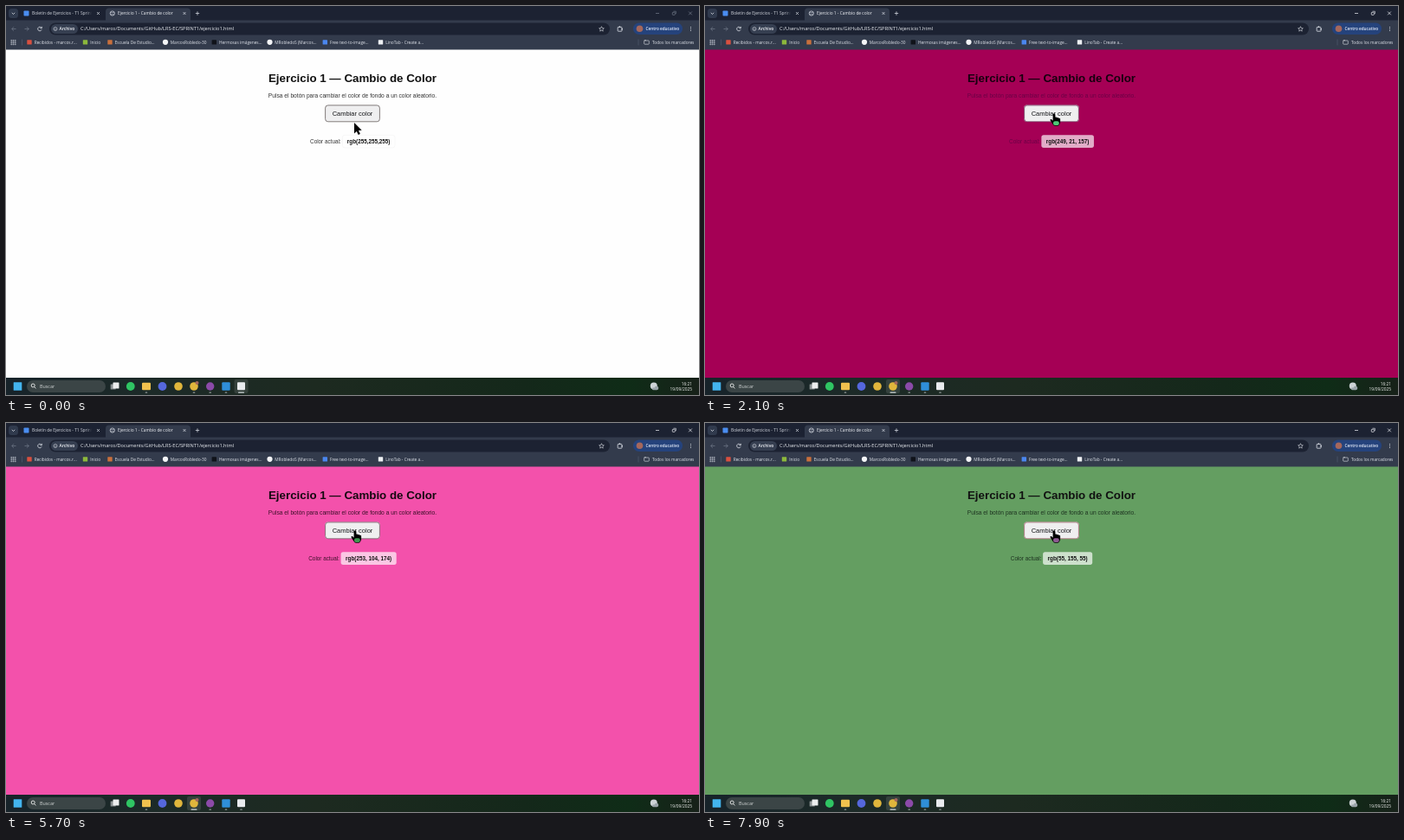
These frames come from a looping animation (800 px wide and 450 px high, 8 s). An HTML page with a canvas:

```html
<!DOCTYPE html>
<html lang="es">
<head>
<meta charset="utf-8">
<title>Cambio de Color</title>
<style>
html, body { margin: 0; width: 100%; height: 100%; overflow: hidden; background: #1c2232; }
canvas { display: block; width: 800px; height: 450px; }
</style>
</head>
<body>
<canvas id="stage" width="800" height="450"></canvas>
<script>
const ctx = document.getElementById('stage').getContext('2d');
const LOOP = 8000, FADE = 250;
const UI = '"Open Sans", "Noto Sans", sans-serif';
const PAGE = '"Liberation Sans", Arial, sans-serif';
const STRIP = '#1c2232', BAR = '#333b4c', PALE = '#dfe3ea';

// One entry per click: time, page colour, label, text colours, button edge, palm tint
const states = [
  { at: 0, bg: [254, 254, 254], label: 'rgb(255,255,255)', head: '#111', body: '#333', badge: '#111', edge: '#77706f', palm: '#000' },
  { at: 500, bg: [128, 0, 48], label: 'rgb(144, 9, 81)', head: '#fff', body: '#fff', badge: '#fff', edge: '#f4e8ee', palm: '#9be3b4' },
  { at: 2000, bg: [232, 0, 152], label: 'rgb(249, 21, 157)', head: '#17000f', body: '#6a0046', badge: '#111', edge: '#7a3a64', palm: '#4fc877' },
  { at: 3700, bg: [80, 30, 36], label: 'rgb(89, 36, 38)', head: '#fff', body: '#fff', badge: '#fff', edge: '#eee6e8', palm: '#b4dcc8' },
  { at: 5000, bg: [243, 81, 171], label: 'rgb(253, 104, 174)', head: '#150910', body: '#3c1029', badge: '#111', edge: '#80616f', palm: '#3f9650' },
  { at: 6500, bg: [212, 152, 162], label: 'rgb(193, 126, 113)', head: '#111', body: '#3a2a2c', badge: '#111', edge: '#6f6468', palm: '#30505a' },
  { at: 7600, bg: [100, 158, 97], label: 'rgb(55, 155, 55)', head: '#111', body: '#1d3320', badge: '#111', edge: '#a8717a', palm: '#8c5a90' }
];

const clamp = v => Math.max(0, Math.min(1, v));
const ease = v => { v = clamp(v); return v * v * (3 - 2 * v); };
const mix = (a, b, k) => a + (b - a) * k;

function rect(x, y, w, h, fill, r = 0) {
  ctx.fillStyle = fill;
  ctx.beginPath();
  ctx.roundRect(x, y, w, h, r);
  ctx.fill();
}
function frame(x, y, w, h, color, r = 0, width = 0.7) {
  ctx.strokeStyle = color;
  ctx.lineWidth = width;
  ctx.beginPath();
  ctx.roundRect(x, y, w, h, r);
  ctx.stroke();
}
function disc(x, y, r, fill) {
  ctx.fillStyle = fill;
  ctx.beginPath();
  ctx.arc(x, y, r, 0, 7);
  ctx.fill();
}
function ring(x, y, r, color, width = 0.7, from = 0, to = 7) {
  ctx.strokeStyle = color;
  ctx.lineWidth = width;
  ctx.beginPath();
  ctx.arc(x, y, r, from, to);
  ctx.stroke();
}
function line(color, width, ...p) {
  ctx.strokeStyle = color;
  ctx.lineWidth = width;
  ctx.beginPath();
  for (let i = 0; i < p.length; i += 2) ctx.lineTo(p[i], p[i + 1]);
  ctx.stroke();
}
function text(s, x, y, size, fill, { font = UI, weight = 400, align = 'left' } = {}) {
  ctx.font = `${weight} ${size}px ${font}`;
  ctx.textAlign = align;
  ctx.fillStyle = fill;
  ctx.fillText(s, x, y);
}
function cross(x, y, r, color) {
  line(color, 0.7, x - r, y - r, x + r, y + r);
  line(color, 0.7, x + r, y - r, x - r, y + r);
}

function drawTabs(active) {
  rect(0, 0, 800, 17, STRIP);
  rect(3, 3, 11, 11, '#303a4d', 3.5);
  line(PALE, 0.8, 6.8, 7.8, 8.5, 9.5, 10.2, 7.8);

  rect(20.5, 5.5, 6, 6, '#4a8df0', 0.8);
  text('Boletín de Ejercicios - T1 Sprint', 30, 10.4, 4.87, '#d5d9e1');
  const fade = ctx.createLinearGradient(93, 0, 99, 0);
  fade.addColorStop(0, 'rgba(28,34,50,0)');
  fade.addColorStop(1, STRIP);
  rect(93, 3, 19, 11, fade);
  cross(106.5, 8.5, 1.5, PALE);

  rect(115, 2.5, 98, 18, BAR, 4);
  ring(122.8, 8.5, 2.6, PALE);
  line(PALE, 0.5, 120.4, 7.7, 125.2, 7.7);
  line(PALE, 0.5, 120.7, 9.8, 124.9, 9.8);
  text('Ejercicio 1 - Cambio de color', 129, 10.4, 4.87, '#f2f4f8');
  cross(206, 8.5, 1.5, PALE);
  line(PALE, 0.7, 218.8, 8.5, 223.2, 8.5);
  line(PALE, 0.7, 221, 6.3, 221, 10.7);

  const c = active ? '#f2f4f8' : '#747c8b';
  line(c, 0.7, 750, 8.5, 754, 8.5);
  frame(769.3, 7.3, 3, 3, c, 0.6);
  line(c, 0.6, 770.5, 6.2, 773.4, 6.2, 773.4, 9.2);
  cross(790, 8.4, 1.9, c);
}

function drawToolbar() {
  rect(0, 16.5, 800, 34, BAR);
  line('#737b8b', 0.7, 11.5, 26.5, 6.8, 26.5);
  line('#737b8b', 0.7, 9, 24.2, 6.7, 26.5, 9, 28.8);
  line('#737b8b', 0.7, 21.5, 26.5, 26.2, 26.5);
  line('#737b8b', 0.7, 24, 24.2, 26.3, 26.5, 24, 28.8);
  ring(39, 26.5, 2.3, PALE, 0.8, 0.4, 5.7);
  line(PALE, 0.8, 41.3, 23.8, 41.3, 25.7, 39.4, 25.7);

  rect(50, 19.5, 647, 14, STRIP, 7);
  rect(52, 21, 31, 11, '#363f51', 5.5);
  ring(57, 26.5, 2, PALE, 0.6);
  line(PALE, 0.6, 57, 26.2, 57, 27.6);
  text('Archivo', 61.5, 28.3, 4.9, '#f2f4f8', { weight: 600 });
  text('C:/Users/marco/Documents/GitHub/LRS-EC/SPRINT1/ejercicio1.html', 86, 28.4, 5.6, '#eef1f5');

  ctx.beginPath();
  for (let i = 0; i < 10; i++) {
    const r = i % 2 ? 1.4 : 3, a = -Math.PI / 2 + i * Math.PI / 5;
    ctx.lineTo(687.5 + r * Math.cos(a), 26.7 + r * Math.sin(a));
  }
  ctx.closePath();
  ctx.strokeStyle = PALE;
  ctx.lineWidth = 0.6;
  ctx.stroke();

  // Extensions: puzzle piece outline
  frame(706.2, 24.4, 4.8, 4.8, PALE, 0.6, 0.8);
  disc(708.4, 24, 0.8, PALE);
  disc(711.2, 26.8, 0.8, PALE);

  rect(724, 19.5, 57, 13.5, '#25437c', 6.7);
  disc(731.5, 26.3, 3.8, '#a5675c');
  text('Centro educativo', 738.5, 28.2, 4.7, '#e6edfb', { weight: 600 });
  for (let i = -1; i < 2; i++) disc(790.5, 26.5 + i * 2, 0.55, PALE);
}

function drawBookmarks() {
  for (let i = 0; i < 9; i++)
    frame(5.8 + (i % 3) * 2.2, 39.4 + Math.floor(i / 3) * 2.2, 1, 1, PALE, 0, 0.5);
  line('#566074', 0.6, 18.5, 38.5, 18.5, 45.5);
  const items = [
    [27, '#d9503f', 'Recibidos - marcos.r...'],
    [91.5, '#8cb83c', 'Inicio'],
    [120, '#c9703c', 'Escuela De Estudio...'],
    [184, '#f4f5f7', 'MarcosRobledo-30'],
    [240.3, '#10131a', 'Hermosas imágenes...'],
    [304.5, '#f4f5f7', 'MRobledoS (Marcos...'],
    [368.3, '#4b86ee', 'Free text-to-image...'],
    [432.5, '#eef0f3', 'LinoTab - Create a...']
  ];
  items.forEach(([x, color, name]) => {
    if (color === '#f4f5f7') disc(x, 41.8, 3.1, color);
    else rect(x - 2.7, 39.2, 5.4, 5.4, color, 0.6);
    text(name, x + 5.7, 43.6, 4.8, PALE);
  });
  line('#566074', 0.6, 730, 38.5, 730, 45.5);
  frame(736.7, 40, 5.6, 4.2, PALE, 0.6, 0.6);
  line(PALE, 0.6, 736.7, 39.7, 739, 39.7);
  text('Todos los marcadores', 746, 43.6, 4.75, PALE);
}

function drawTaskbar(active) {
  const g = ctx.createLinearGradient(0, 0, 800, 0);
  g.addColorStop(0, '#17232a');
  g.addColorStop(0.2, '#1c2a28');
  g.addColorStop(0.45, '#1d2a20');
  g.addColorStop(0.75, '#14281a');
  g.addColorStop(0.9, '#0f2c17');
  g.addColorStop(1, '#172119');
  rect(0, 430, 800, 20, g);
  rect(8.7, 435.2, 9.6, 9.6, '#43b4ee', 0.5);
  rect(24, 433, 91, 14, '#3b4546', 7);
  ring(31.2, 439, 2, '#eee', 0.9);
  line('#eee', 0.9, 32.6, 440.5, 34.4, 442.4);
  text('Buscar', 39, 442, 5.4, '#d4d8d8');

  const lit = active ? 217 : 271.5;
  rect(lit - 8, 432, 16, 16, 'rgba(255,255,255,.11)', 2);

  rect(120.7, 437.5, 6, 6, '#8a9192', 0.5);
  rect(123.5, 435.5, 7, 7, '#eceeee', 0.5);
  disc(143.8, 440, 4.9, '#2fc563');
  rect(157, 435.7, 10, 8.6, '#f0c14e', 1);
  disc(180.5, 440, 4.9, '#5567dc');
  disc(199, 440, 4.8, '#e0b63c');
  disc(217, 440, 4.8, '#e0b63c');
  disc(220.5, 436, 2, '#a5675c');
  disc(235.7, 440, 4.7, '#8b4aa8');
  rect(249.3, 435.3, 9.4, 9.4, '#2f8fd8', 1);
  rect(267, 435.3, 9, 9, '#e9ebee', 1);
  [162, 217, 235.7, 254, 271.5].forEach(x => {
    const w = x === lit ? 7 : 2.6;
    rect(x - w / 2, 446.6, w, 1.2, x === lit ? '#cfd8da' : '#8f9896', 0.6);
  });

  disc(747.8, 439.5, 4, '#cdd3d6');
  disc(751, 442, 2.3, '#9aa4a9');
  rect(746, 441.5, 6, 2.7, '#9aa4a9', 1.3);
  text('16:21', 792, 438.5, 4.8, '#f0f2f0', { align: 'right' });
  text('19/09/2025', 792, 445.2, 4.8, '#f0f2f0', { align: 'right' });
}

function drawPage(t, index) {
  const s = states[index], prev = states[Math.max(0, index - 1)];
  const k = ease((t - s.at) / FADE);
  const bg = s.bg.map((v, i) => Math.round(mix(prev.bg[i], v, k)));
  rect(0, 50, 800, 380.5, `rgb(${bg})`);

  const page = { font: PAGE, align: 'center' };
  text('Ejercicio 1 — Cambio de Color', 400, 87.6, 13.333, s.head, { ...page, weight: 700 });
  text('Pulsa el botón para cambiar el color de fondo a un color aleatorio.', 400, 106.1, 6.667, s.body, page);

  rect(368.3, 114.6, 63.4, 19.4, '#efeff0', 3.4);
  frame(368.6, 114.9, 62.8, 18.9, s.edge, 3.2, 0.9);
  text('Cambiar color', 400, 126.7, 7.5, '#18191c', page);

  const size = 6.33, pad = 5.5, lead = 'Color actual: ';
  ctx.font = `400 ${size}px ${PAGE}`;
  const leadW = ctx.measureText(lead).width;
  ctx.font = `700 ${size}px ${PAGE}`;
  const badgeW = ctx.measureText(s.label).width + pad * 2;
  const x = 400 - (leadW + badgeW) / 2;
  text(lead, x, 158.8, size, s.body, { font: PAGE });
  rect(x + leadW, 149.3, badgeW, 14.6, 'rgba(255,255,255,.68)', 2.6);
  if (!index) frame(x + leadW, 149.3, badgeW, 14.6, '#f2f2f2', 2.6, 0.6);
  text(s.label, x + leadW + pad, 158.8, size, s.badge, { font: PAGE, weight: 700 });
}

function drawArrow(x, y) {
  const p = [0, 0, 0, 12.4, 2.8, 9.9, 4.7, 14, 6.9, 13, 5, 9, 8.7, 8.8];
  ctx.beginPath();
  for (let i = 0; i < p.length; i += 2) ctx.lineTo(x + p[i], y + p[i + 1]);
  ctx.closePath();
  ctx.fillStyle = '#000';
  ctx.fill();
}

function drawHand(x, y, palm) {
  rect(x - 1.4, y, 2.8, 10, '#000', 1.4);
  rect(x + 0.6, y + 3.9, 2.8, 6, '#000', 1.3);
  rect(x + 2.8, y + 4.5, 2.6, 6, '#000', 1.3);
  rect(x + 4.8, y + 5.2, 2.3, 6, '#000', 1.1);
  ctx.beginPath();
  ctx.moveTo(x - 1.4, y + 8);
  ctx.lineTo(x - 3.2, y + 6.5);
  ctx.quadraticCurveTo(x - 5.2, y + 6.2, x - 4.3, y + 8);
  ctx.lineTo(x - 1.4, y + 12.4);
  ctx.quadraticCurveTo(x - 0.6, y + 14.2, x + 1, y + 14.2);
  ctx.lineTo(x + 4.3, y + 14.2);
  ctx.quadraticCurveTo(x + 7, y + 13.2, x + 7.1, y + 8);
  ctx.closePath();
  ctx.fillStyle = '#000';
  ctx.fill();
  rect(x - 1, y + 8.7, 6.8, 4.7, palm, 2);
}

function drawCursor(t, s) {
  const x = 402 + ease((t - 100) / 250) * 2 - ease((t - 900) / 500);
  const y = 135 - ease((t - 100) / 250) * 7 - ease((t - 900) / 500) * 3.5;
  if (y > 134) drawArrow(x, y);
  else drawHand(x, y, s.palm);
}

function draw(now) {
  const t = now % LOOP;
  let index = 0;
  while (index + 1 < states.length && t >= states[index + 1].at) index++;
  const active = index > 0;
  drawPage(t, index);
  drawTabs(active);
  drawToolbar();
  drawBookmarks();
  drawTaskbar(active);
  drawCursor(t, states[index]);
}

const start = performance.now();
function tick() {
  draw(performance.now() - start);
  requestAnimationFrame(tick);
}
tick();
</script>
</body>
</html>
```
